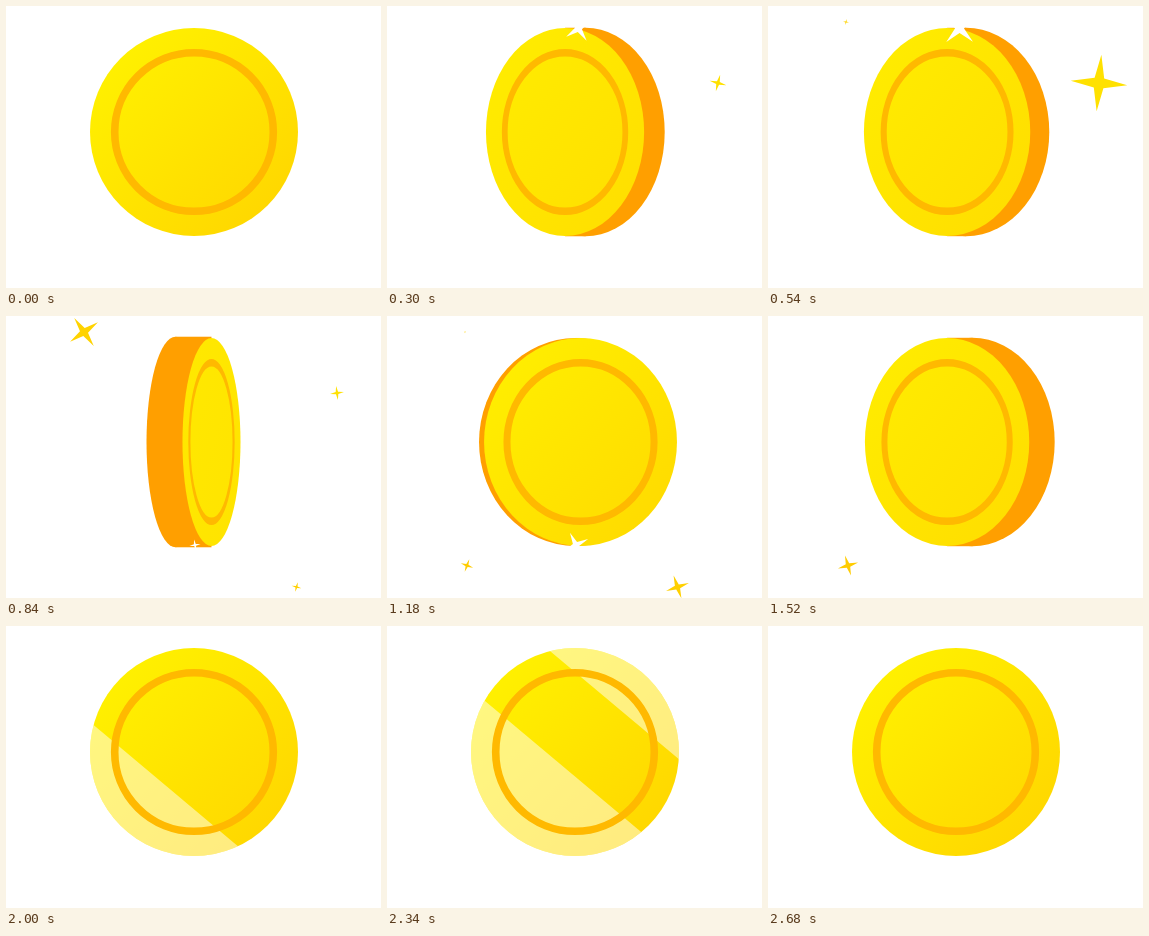
An HTML page with a canvas for the animation above (3.08 s loop, 375x282 px).

```html
<!DOCTYPE html>
<html lang="en">
<head>
<meta charset="utf-8">
<title>Spinning coin</title>
<style>
  html, body { margin: 0; width: 100%; height: 100%; overflow: hidden; background: #fff; }
  canvas { display: block; width: 375px; height: 282px; }
</style>
</head>
<body>
<canvas id="stage"></canvas>
<script>
const W = 375, H = 282, LOOP = 3080, STEP = 20;
const CX = 188, CY = 126, R = 104;
const canvas = document.getElementById('stage');
const ctx = canvas.getContext('2d');
const dpr = window.devicePixelRatio || 1;
canvas.width = W * dpr;
canvas.height = H * dpr;

// time, half turns, coin thickness, middle x
const spin = [
  [0, 0, 31.7, 188],
  [540, 2.205, 31.7, 188.6],
  [840, 3.59, 39, 187.5],
  [1180, 4.878, 36, 191],
  [1520, 6.21, 41.5, 191.8],
  [1710, 7, 41.5, 188]
];

// Each star grows to its peak time and shrinks again.
const HALF_LIFE = 365;
const stars = [
  { x: 331, y: 77, r: 30, peak: 560, angle: 4, rate: -0.04, color: '#ffe100' },
  { x: 78, y: 16, r: 17, peak: 840, angle: -35, rate: -0.15, color: '#ffd300' },
  { x: 290.5, y: 271, r: 16, peak: 1090, angle: -10, rate: -0.1, color: '#ffd000' },
  { x: 80, y: 249.5, r: 16, peak: 1395, angle: -3, rate: -0.109, color: '#ffcc00' },
  { x: 191.5, y: 22.5, r: 25, peak: 450, angle: 49, rate: -0.05, color: '#fff' },
  { x: 189, y: 229, r: 18, peak: 1090, angle: -22, rate: -0.05, color: '#fff' }
];

function spinAt(t) {
  const last = spin[spin.length - 1];
  if (t >= last[0]) return last.slice(1);
  const i = spin.findIndex(k => k[0] > t);
  const a = spin[i - 1], b = spin[i];
  const f = (t - a[0]) / (b[0] - a[0]);
  return [1, 2, 3].map(n => a[n] + (b[n] - a[n]) * f);
}

function drawEdge(front, back, rx, bulge) {
  const ry = R + 1.5 * bulge;
  ctx.fillStyle = '#ff9f00';
  ctx.beginPath();
  ctx.ellipse(back, CY, rx, ry, 0, 0, 2 * Math.PI);
  ctx.fill();
  ctx.fillRect(Math.min(front, back), CY - ry, Math.abs(front - back), 2 * ry);
}

function drawShine(t) {
  const lead = -R + 0.78 * (t - 1923);
  ctx.save();
  ctx.clip();
  ctx.rotate(-50 * Math.PI / 180);
  ctx.fillStyle = 'rgba(255,255,255,.5)';
  ctx.fillRect(lead - 160, -150, 160, 300);
  ctx.fillRect(lead - 382, -150, 142, 300);
  ctx.restore();
}

function drawFace(x, scale, tilt, t) {
  ctx.save();
  ctx.translate(x, CY);
  ctx.scale(Math.max(scale, 0.001), 1);
  const fill = ctx.createLinearGradient(-74, -74, 74, 74);
  fill.addColorStop(0, `rgb(255,${Math.round(240 - 8 * tilt)},0)`);
  fill.addColorStop(1, `rgb(255,${Math.round(216 + 12 * tilt)},0)`);
  ctx.fillStyle = fill;
  ctx.beginPath();
  ctx.arc(0, 0, R, 0, 2 * Math.PI);
  ctx.fill();
  if (t >= 1920 && t < 2680) drawShine(t);
  ctx.strokeStyle = '#ffb900';
  ctx.lineWidth = 7.6;
  ctx.beginPath();
  ctx.arc(0, 0, 79.3, 0, 2 * Math.PI);
  ctx.stroke();
  ctx.restore();
}

function drawCoin(t) {
  const [turns, depth, mid] = spinAt(t);
  const phase = turns % 1;
  const scale = Math.abs(Math.cos(Math.PI * phase));
  const tilt = Math.sin(Math.PI * phase);
  const offset = depth * (phase < 0.5 ? -tilt : tilt * tilt) / 2;
  if (tilt > 0.001) drawEdge(mid + offset, mid - offset, R * scale, tilt ** 4);
  drawFace(mid + offset, scale, tilt, t);
}

function drawStar(star, t) {
  const age = t - star.peak;
  const size = star.r * (1 - Math.abs(age) / HALF_LIFE);
  if (size <= 0) return;
  const turn = (star.angle + star.rate * age) * Math.PI / 180;
  ctx.fillStyle = star.color;
  ctx.beginPath();
  for (let i = 0; i < 8; i++) {
    const a = turn + i * Math.PI / 4;
    const d = i % 2 ? size * 0.24 : size;
    ctx.lineTo(star.x + d * Math.cos(a), star.y + d * Math.sin(a));
  }
  ctx.fill();
}

const start = performance.now();

function frame() {
  const elapsed = Math.max(0, performance.now() - start) % LOOP;
  const t = Math.floor(elapsed / STEP) * STEP;
  ctx.setTransform(dpr, 0, 0, dpr, 0, 0);
  ctx.fillStyle = '#fff';
  ctx.fillRect(0, 0, W, H);
  drawCoin(t);
  stars.forEach(star => drawStar(star, t));
  requestAnimationFrame(frame);
}

frame();
</script>
</body>
</html>
```
